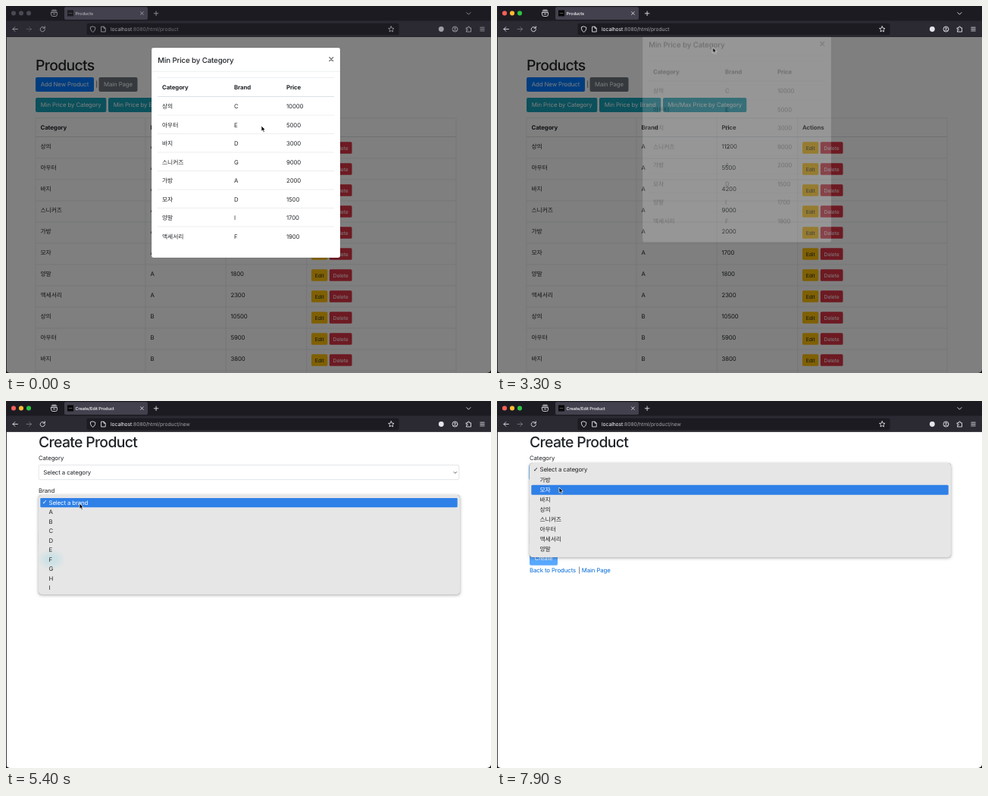
Write an HTML page that moves like this. It is 640x484 px and loops after 8 s.

```html
<!DOCTYPE html>
<html lang="ko">
<head>
<meta charset="utf-8">
<title>Products</title>
<style>
html, body { margin: 0; width: 100%; height: 100%; overflow: hidden; background: #fff; }
#stage { position: absolute; left: 0; top: 0; width: 640px; height: 484px; overflow: hidden; }
svg { position: absolute; left: 0; top: 0; }
text, .menu {
  font: 400 7.8px Inter, "Noto Sans CJK KR", "Noto Sans CJK", sans-serif;
  letter-spacing: -.013em; fill: #212529; text-rendering: geometricPrecision; white-space: pre;
}
.h1 { font-size: 19.4px; font-weight: 500; letter-spacing: -.035em; }
.h5 { font-size: 9.7px; font-weight: 500; }
.b { font-weight: 700; }
.w { fill: #fff; }
.mid { text-anchor: middle; }
.sm { font-size: 6.8px; }
.tab { font-size: 5.6px; font-weight: 500; fill: #fbfbfe; }
.url { font-size: 6.8px; fill: #a3a2aa; }
.url tspan { fill: #fbfbfe; }
.link { fill: #0069d9; }
.ico { fill: none; stroke: #e4e4ea; stroke-width: .9; stroke-linecap: round; stroke-linejoin: round; }
.line { stroke: #dee2e6; stroke-width: .6; fill: none; }

.menu { position: absolute; left: 42.5px; width: 556px; box-sizing: border-box; border-radius: 4px;
  background-color: #e6e6e6; color: #222; box-shadow: 0 1px 4px rgba(0,0,0,.35), 0 0 .5px rgba(0,0,0,.5); }
.menu div div { padding-left: 11.2px; height: var(--row); line-height: var(--row); }
.list { position: absolute; left: 2.8px; right: 2.8px; top: var(--pad); }
.hot { background: #2f80e7; color: #fff; }
.list div:first-child::before { content: "✓"; position: absolute; left: 2.4px; font: 700 8px "DejaVu Sans", sans-serif; line-height: var(--row); }
#brand { top: 124px; height: 131px; --row: 12.5px; --pad: 3.75px;
  background-image: radial-gradient(19px 14px at 17px 85px, #cde2e5 35%, #cde2e500); }
#category { top: 81.5px; height: 124.5px; --row: 13.1px; --pad: 2.95px; }

.cut, .run { animation: 8s infinite step-end; }
.run { animation-timing-function: linear; }
@keyframes awake { 0% { opacity: 0 } 35.75%, 100% { opacity: 1 } }
@keyframes bright { 0% { opacity: .62 } 35.75%, 100% { opacity: 1 } }
@keyframes ring { 0% { opacity: 0 } 37.75% { opacity: 1 } 39.75%, 100% { opacity: 0 } }
@keyframes hand { 0% { opacity: 0 } 37% { opacity: 1 } 39.9%, 100% { opacity: 0 } }
@keyframes arrow { 0% { opacity: 1 } 37% { opacity: 0 } 39.9%, 100% { opacity: 1 } }
@keyframes modal { 0%, 39.75% { opacity: 1; transform: none } 41.6%, 100% { opacity: 0; transform: translateY(-25px) } }
@keyframes shade { 0%, 41.5% { opacity: .5 } 42.5% { opacity: .22 } 43.3%, 100% { opacity: 0 } }
@keyframes scrollbar { 0% { opacity: 0 } 43.6% { opacity: 1 } 53.25%, 100% { opacity: 0 } }
@keyframes pressed { 0% { opacity: 0 } 49.8%, 100% { opacity: 1 } }
@keyframes status { 0% { opacity: 0 } 50.75% { opacity: 1 } 53.25%, 100% { opacity: 0 } }
@keyframes before { 0% { opacity: 1 } 51.9%, 100% { opacity: 0 } }
@keyframes after { 0% { opacity: 0 } 51.9%, 100% { opacity: 1 } }
@keyframes loading { 0% { opacity: 0 } 51.9% { opacity: 1 } 54.5%, 100% { opacity: 0 } }
@keyframes idle { 0% { opacity: 1 } 51.9% { opacity: 0 } 54.5%, 100% { opacity: 1 } }
@keyframes form { 0% { opacity: 0 } 53.25%, 100% { opacity: 1 } }
@keyframes brandFocus { 0% { opacity: 0 } 68.2% { opacity: 1 } 91.2%, 100% { opacity: 0 } }
@keyframes categoryFocus { 0% { opacity: 0 } 91.75%, 100% { opacity: 1 } }
@keyframes unset { 0% { opacity: 1 } 87.2%, 100% { opacity: 0 } }
@keyframes chosen { 0% { opacity: 0 } 87.2%, 100% { opacity: 1 } }
@keyframes brandOpen { 0% { opacity: 0 } 65.9% { opacity: 1 } 87.25%, 100% { opacity: 0 } }
@keyframes categoryOpen { 0% { opacity: 0 } 91.75%, 100% { opacity: 1 } }
@keyframes brandHot {
  0% { clip-path: inset(0 0 112.5px round 1.5px) }
  70.5%, 83.5% { clip-path: inset(12.5px 0 100px round 1.5px) }
  74.2%, 82.6% { clip-path: inset(25px 0 87.5px round 1.5px) }
  76.2% { clip-path: inset(37.5px 0 75px round 1.5px) }
  85.6%, 100% { clip-path: inset(0 0 100%) }
}
@keyframes categoryHot {
  0% { clip-path: inset(0 0 104.8px round 1.5px) }
  95% { clip-path: inset(13.1px 0 91.7px round 1.5px) }
  97.4%, 100% { clip-path: inset(26.2px 0 78.6px round 1.5px) }
}
@keyframes cursor {
  0% { transform: translate(337px, 158px) }
  7.5%, 8.75% { transform: translate(345px, 182px) }
  15%, 16.25% { transform: translate(350px, 235px) }
  27.5% { transform: translate(360px, 140px) }
  30%, 31.25% { transform: translate(390px, 110px) }
  37.5%, 39.4% { transform: translate(427px, 66px) }
  42.5% { transform: translate(190px, 47px) }
  47.5% { transform: translate(96px, 97px) }
  52.5%, 58.75% { transform: translate(95px, 96px) }
  65%, 67.5% { transform: translate(97px, 135px) }
  72.5% { transform: translate(94px, 146px) }
  77.5%, 81.25% { transform: translate(92px, 171px) }
  85%, 87.5% { transform: translate(87px, 144px) }
  91.25%, 93.1% { transform: translate(85px, 92px) }
  98.75%, 100% { transform: translate(82px, 114px) }
}
</style>
</head>
<body>
<div id="stage"></div>
<script>
const text = (x, y, label, cls = '') => `<text x="${x}" y="${y}" class="${cls}">${label}</text>`;
const rect = (x, y, w, h, fill, r = 0, extra = '') =>
  `<rect x="${x}" y="${y}" width="${w}" height="${h}" rx="${r}" fill="${fill}" ${extra}/>`;
const path = (d, cls = 'ico', extra = '') => `<path d="${d}" class="${cls}" ${extra}/>`;
const dot = (x, y, r, fill) => `<circle cx="${x}" cy="${y}" r="${r}" fill="${fill}"/>`;
const cut = (name, body) => `<g class="cut" style="animation-name:${name}">${body}</g>`;
const run = (name, body) => `<g class="run" style="animation-name:${name}">${body}</g>`;
const range = (n, draw) => Array.from({ length: n }, (_, i) => draw(i)).join('');
const svg = body => `<svg width="640" height="484" viewBox="0 0 640 484">${body}</svg>`;
const button = (x, y, w, label, fill) =>
  rect(x, y, w, 19, fill, 2) + text(x + w / 2, y + 12.3, label, 'w mid');
const smallButton = (x, y, w, label, fill, cls) =>
  rect(x, y, w, 15.5, fill, 1.6) + text(x + w / 2, y + 10.3, label, 'mid sm ' + cls);

const kinds = ['상의', '아우터', '바지', '스니커즈', '가방', '모자', '양말', '액세서리'];
const prices = [11200, 5500, 4200, 9000, 2000, 1700, 1800, 2300, 10500, 5900, 3800];
const cheapest = ['C 10000', 'E 5000', 'D 3000', 'G 9000', 'A 2000', 'D 1500', 'I 1700', 'F 1900'];

function productsPage() {
  const columns = [45.5, 190.5, 296.5, 403];
  const row = i => {
    const y = 173 + 28 * i;
    return text(columns[0], y + 14.8, kinds[i % 8]) + text(columns[1], y + 15, i < 8 ? 'A' : 'B') +
      text(columns[2], y + 15, prices[i]) +
      smallButton(403, y + 6.3, 21.3, 'Edit', '#ffc107', '') +
      smallButton(426.8, y + 6.3, 29.7, 'Delete', '#dc3545', 'w') +
      path(`M39 ${y + 28}H594`, 'line');
  };
  const focus = rect(39, 94, 77, 19, '#0062cc', 2, 'stroke="#007bff" stroke-opacity=".5" stroke-width="2.6"') +
    text(77.5, 106.3, 'Add New Product', 'w mid');
  return rect(0, 40, 640, 444, '#fff') + text(39, 85, 'Products', 'h1') +
    button(39, 94, 77, 'Add New Product', '#007bff') + cut('pressed', focus) +
    text(118.4, 106, '|') + button(122.5, 94, 51, 'Main Page', '#6c757d') +
    button(39, 121, 93.3, 'Min Price by Category', '#17a2b8') +
    button(135, 121, 81.3, 'Min Price by Brand', '#17a2b8') +
    button(219, 121, 110.3, 'Min/Max Price by Category', '#17a2b8') +
    ['Category', 'Brand', 'Price', 'Actions'].map((s, i) => text(columns[i], 163, s, 'b')).join('') +
    path('M39 484V147.7H594V484M184 147.7V484M290.3 147.7V484M396.7 147.7V484', 'line') +
    path('M39 172.5H594', 'line', 'style="stroke-width:1"') + range(11, row) +
    cut('scrollbar', rect(634.8, 41, 4.2, 85, '#c3c3c3', 2));
}

function modal() {
  const row = i => {
    const y = 135 + 24.5 * i, [brand, price] = cheapest[i].split(' ');
    return text(206, y, kinds[i]) + text(301, y, brand) + text(370, y, price) +
      (i ? path(`M200 ${y - 15.5}H433`, 'line') : '');
  };
  return rect(192, 55, 249, 277, '#fff', 2.4, 'stroke="#000" stroke-opacity=".25" stroke-width=".5"') +
    text(200.3, 74.5, 'Min Price by Category', 'h5') +
    path('M426.8 67.8L431.6 72.6M431.6 67.8L426.8 72.6', 'ico', 'style="stroke:#777;stroke-width:1.4"') +
    path('M192 86.3H441M200 94.6H433', 'line') +
    path('M200 119.5H433', 'line', 'style="stroke-width:1"') +
    text(206, 110, 'Category', 'b') + text(301, 110, 'Brand', 'b') + text(370, 110, 'Price', 'b') + range(8, row);
}

function formPage() {
  const field = (y, name, body, arrow = true) => text(43, y - 6.4, name) +
    rect(43.2, y, 554.6, 19.3, '#fff', 2, 'stroke="#ced4da" stroke-width=".6"') + body +
    (arrow ? path(`M591 ${y + 9.2}l1.8 1.8 1.8-1.8`, 'ico', 'style="stroke:#444"') : '');
  const focus = y => rect(42.8, y - .3, 555.4, 19.9, 'none', 2.4, 'stroke="#80bdff" stroke-width="1.4"');
  return rect(0, 40, 640, 444, '#fff') + text(43, 60.5, 'Create Product', 'h1') +
    field(84.4, 'Category', text(49.3, 97.2, 'Select a category') + cut('categoryFocus', focus(84.4))) +
    field(127.4, 'Brand', cut('unset', text(49.3, 140.2, 'Select a brand')) +
      cut('chosen', text(49.3, 140.2, 'A')) + cut('brandFocus', focus(127.4))) +
    field(170.4, 'Price', '', false) +
    `<g opacity=".65">${button(43, 197.8, 37, 'Create', '#007bff')}</g>` +
    text(43, 225.8, 'Back to Products', 'link') + text(107.4, 225.8, '|') + text(111.8, 225.8, 'Main Page', 'link');
}

function browser() {
  const lights = colors => colors.map((c, i) => dot(10 + 10 * i, 9.6, 3, c)).join('');
  const address = end => `<text x="138" y="33" class="url"><tspan>localhost</tspan>:8080/html/product${end}</text>`;
  const favicon = rect(81, 5.5, 8, 8, '#050505') + rect(82.5, 9, 5, .7, '#777');
  const icons =
    path('M60 6.8h7M59.6 8.5h7.8v3a2 2 0 0 1-2 2h-3.8a2 2 0 0 1-2-2zM61 5.2h5M62.2 10.6h2.6') +
    path('M177.6 7.8l3.6 3.6M181.2 7.8l-3.6 3.6M195.3 9.8h5.6M198.1 7v5.6M607.8 8.6l2.6 2.6 2.6-2.6') +
    path('M15.4 30.5H9M11.8 27.7L9 30.5l2.8 2.8') +
    path('M27 30.5h6.4M30.6 27.7l2.8 2.8-2.8 2.8', 'ico', 'opacity=".4"') +
    path('M114.6 27l3.2 1.2c0 3-.8 5-3.2 6.2-2.4-1.2-3.2-3.2-3.2-6.2z') +
    path('M126 27.2h3.2l2 2v4.8H126zM129 27.3v2h2') +
    path('M508.3 26.8l1.1 2.4 2.6.3-1.9 1.8.5 2.6-2.3-1.3-2.3 1.3.5-2.6-1.9-1.8 2.6-.3z') +
    dot(574.3, 30.5, 3.4, '#e4e4ea') +
    path('M596 30.5a3.5 3.5 0 1 1-7 0a3.5 3.5 0 1 1 7 0M590.4 32.8c.8-1.4 3.4-1.4 4.2 0M593.5 29.4a1 1 0 1 1-2 0a1 1 0 1 1 2 0') +
    path('M607.5 28.8h2v-.8a1 1 0 0 1 2 0v.8h2v5.2h-6v-1.8h.8a.9.9 0 0 0 0-1.8h-.8z') +
    path('M625.8 28.2h5.4M625.8 30.5h5.4M625.8 32.8h5.4') +
    cut('idle', favicon + path('M50.6 28.6a3.1 3.1 0 1 0 .8 2.2M51.3 26.9v2.3H49')) +
    cut('loading', dot(86, 9.6, 1, '#aaa') + path('M45.8 28l4.2 4.6')) +
    cut('before', text(91.6, 11.8, 'Products', 'tab') + address('')) +
    cut('after', text(91.6, 11.8, 'Create/Edit Product', 'tab') + address('/new'));
  return rect(0, 0, 640, 20, '#1c1b22') + rect(0, 19.5, 640, 21, '#2b2a33') + rect(0, 40, 640, .6, '#0c0c0d') +
    rect(77, 1.3, 110, 16.6, '#42414d', 2) + rect(106.5, 22.8, 412, 15.5, '#1c1b22', 2) +
    lights(['#4b4a53', '#4b4a53', '#4b4a53']) + cut('awake', lights(['#ff5f57', '#febc2e', '#28c840'])) +
    cut('bright', icons) +
    cut('status', rect(0, 475.3, 121.5, 9, '#2b2a33', 1) + text(2.5, 481.8, 'localhost', 'tab')) +
    rect(0, 0, .9, 484, '#25242b') +
    path('M0 479v5h5a5 5 0 0 1-5-5M640 479v5h-5a5 5 0 0 0 5-5', '', 'fill="#111"');
}

function menu(id, items) {
  const rows = items.map(s => `<div>${s}</div>`).join('');
  return `<div id="${id}" class="menu cut" style="animation-name:${id}Open"><div class="list">${rows}</div>` +
    `<div class="list hot cut" style="animation-name:${id}Hot">${rows}</div></div>`;
}

function pointer() {
  const outline = 'stroke="#fff" stroke-width=".7" stroke-linejoin="round"';
  const ring = '<circle cx="427" cy="66.5" r="15" fill="#fff" fill-opacity=".85" stroke="#111" stroke-width="1"/>';
  const arrow = path('M0 0V7.2L1.7 5.7L2.9 8.4L4.2 7.8L3 5.2H5.2Z', '', 'fill="#000" ' + outline);
  const hand = path('M0 .4Q.9-.4 1.5.5L2.2 3L4.6 3.6Q5.6 4 5.3 5.4L4.7 8.6H1.2L-1.6 5.2Q-1.4 4.2-.2 4.9L.4 5.2Z', '',
    'fill="#fff" stroke="#000" stroke-width=".8" stroke-linejoin="round"');
  return cut('ring', ring) + run('cursor', cut('arrow', arrow) + cut('hand', hand));
}

const shade = rect(0, 40, 640, 444, '#000');
document.getElementById('stage').innerHTML =
  svg(productsPage() + cut('form', formPage()) + run('shade', shade) + run('modal', modal()) + browser()) +
  menu('brand', ['Select a brand', ...'ABCDEFGHI']) +
  menu('category', ['Select a category', ...[...kinds].sort()]) +
  svg(pointer());
</script>
</body>
</html>
```
